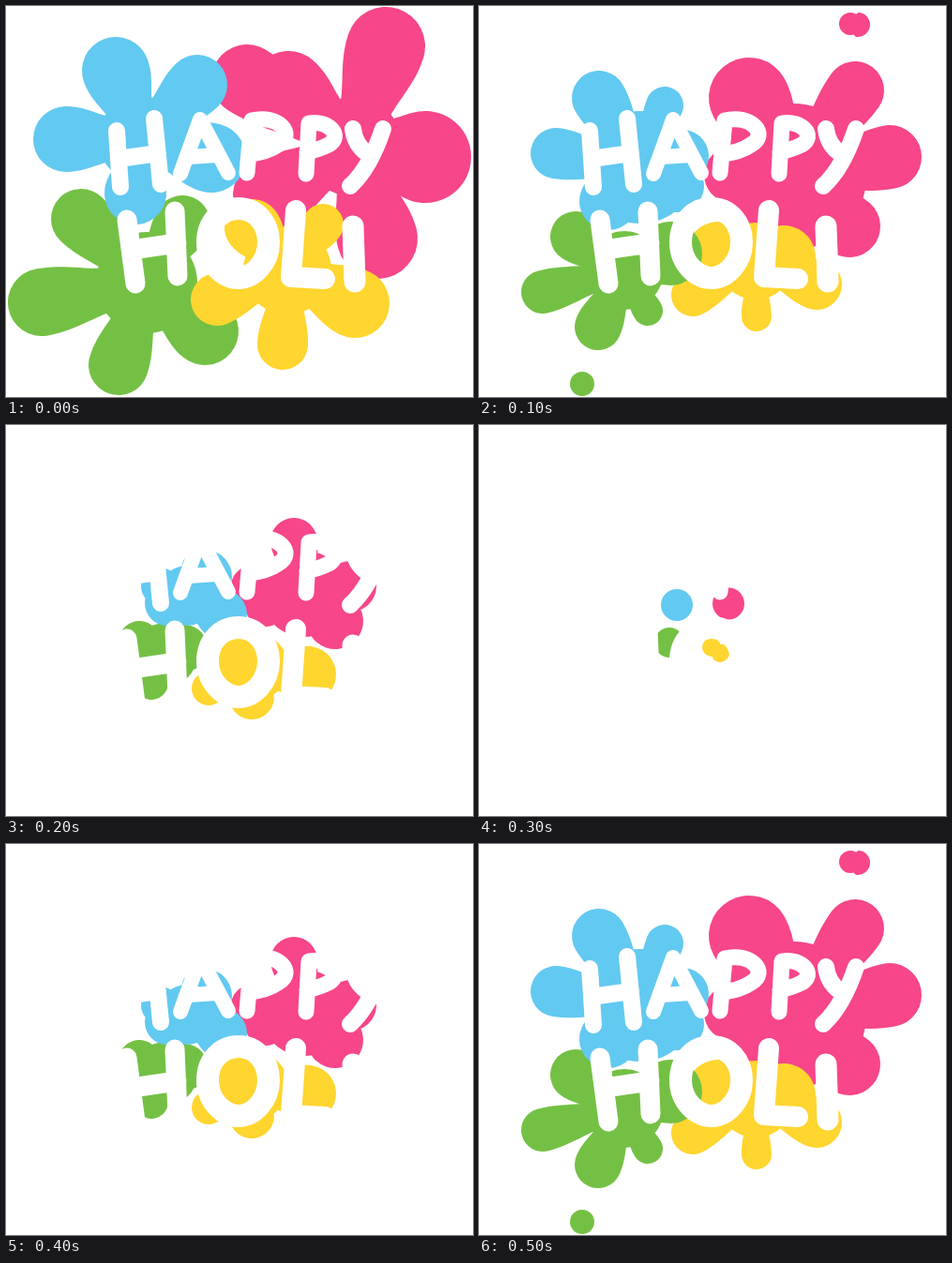
Write an HTML page with a canvas that moves like this. It is 498x417 px and loops after 600 ms.

```html
<!DOCTYPE html>
<html lang="en">
<head>
<meta charset="utf-8">
<title>Happy Holi</title>
<style>
html, body { margin: 0; width: 100%; height: 100%; overflow: hidden; background: #fff; }
canvas { display: block; width: 100vw; height: 100vh; }
</style>
</head>
<body>
<canvas id="stage" width="498" height="417"></canvas>
<script>
const ctx = document.getElementById('stage').getContext('2d');
const PINK = '#f7468a', BLUE = '#62c9f1', GREEN = '#74c044', YELLOW = '#ffd52f';

// A splat is a round core (x, y, radius) with petals, each given by its round tip.
function splat(color, x, y, core, ...petals) {
  ctx.fillStyle = color;
  ctx.beginPath();
  ctx.arc(x, y, core, 0, 7);
  ctx.fill();
  for (const [tipX, tipY, r] of petals) {
    const length = Math.hypot(tipX - x, tipY - y), neck = r * 0.55;
    ctx.save();
    ctx.translate(x, y);
    ctx.rotate(Math.atan2(tipY - y, tipX - x));
    ctx.beginPath();
    ctx.moveTo(0, -neck);
    ctx.bezierCurveTo(length * 0.5, -neck, length * 0.65, -r, length, -r);
    ctx.arc(length, 0, r, -Math.PI / 2, Math.PI / 2);
    ctx.bezierCurveTo(length * 0.65, r, length * 0.5, neck, 0, neck);
    ctx.fill();
    ctx.restore();
  }
}

// Splats of each pose, in paint order.
const wide = [
  [PINK, 370, 150, 53, [405, 43, 42], [447, 161, 49], [396, 248, 43], [282, 202, 40], [257, 79, 38], [301, 88, 40]],
  [GREEN, 150, 295, 54, [80, 227, 32], [38, 316, 36], [120, 383, 32], [212, 347, 36], [188, 232, 30]],
  [YELLOW, 300, 282, 47, [263, 236, 30], [338, 233, 22], [372, 317, 37], [295, 361, 27], [225, 313, 28]],
  [BLUE, 144, 142, 46, [117, 69, 36], [64, 142, 35], [138, 200, 33], [219, 162, 37], [204, 84, 32]]
];
const mid = [
  [PINK, 335, 182, 78, [288, 98, 43], [401, 90, 31], [438, 161, 34], [395, 235, 33], [270, 180, 30]],
  [YELLOW, 295, 272, 41, [228, 308, 23], [296, 331, 16], [360, 297, 27], [325, 268, 34], [255, 264, 34]],
  [GREEN, 155, 282, 42, [103, 246, 27], [68, 305, 23], [127, 342, 25], [180, 325, 16], [204, 264, 34]],
  [BLUE, 172, 172, 60, [128, 98, 29], [82, 157, 27], [198, 106, 20], [217, 160, 28], [138, 208, 31], [212, 192, 28]],
  [PINK, 396, 19, 12, [404, 20, 13]],
  [GREEN, 110, 403, 13]
];
const small = [
  [PINK, 318, 180, 46, [307, 124, 25], [368, 172, 27], [351, 209, 30], [262, 172, 22], [277, 193, 22]],
  [GREEN, 170, 245, 34, [142, 231, 22], [155, 275, 18], [190, 238, 25]],
  [YELLOW, 265, 258, 36, [262, 290, 24], [322, 266, 30], [216, 281, 18], [242, 246, 24]],
  [BLUE, 193, 182, 32, [212, 162, 29], [164, 172, 20], [230, 202, 27], [172, 190, 24]]
];
const tiny = [
  [PINK, 266, 190.5, 17],
  [GREEN, 203, 232, 16],
  [YELLOW, 248, 237, 10, [257, 243, 10]],
  [BLUE, 211, 192, 17]
];
const poses = [wide, mid, small, tiny, small, mid];

// Letter strokes: [width, path].
const letters = [
  [18, 'M118 133L122 193M158 120L165 190M120 163L162 157'],
  [16, 'M186 179L207 121L237 178M195 161L225 159'],
  [17, 'M262 122L257 178M262 122C290 115 310 137 290 148C280 155 269 157 259 158'],
  [17, 'M323 125L320 179M323 125C344 121 360 139 344 148Q334 153 321 156'],
  [18, 'M370 131Q372 148 385 157M402 131Q388 173 367 192'],
  [21, 'M129 228L138 296M180 219L183 288M134 260L182 253'],
  [24, 'M248 216C266 216 280 231 280 252S264 290 248 290S215 274 215 252S230 216 248 216Z'],
  [22, 'M309 218L304 289L340 291'],
  [23, 'M370 235L372 294']
].map(([width, d]) => [width, new Path2D(d)]);

function draw(step) {
  ctx.fillStyle = '#fff';
  ctx.fillRect(0, 0, 498, 417);
  for (const shape of poses[step]) splat(...shape);
  ctx.strokeStyle = '#fff';
  ctx.lineCap = ctx.lineJoin = 'round';
  for (const [width, path] of letters) {
    ctx.lineWidth = width;
    ctx.stroke(path);
  }
}

function tick() {
  draw(Math.floor(performance.now() % 600 / 100));
  requestAnimationFrame(tick);
}
tick();
</script>
</body>
</html>
```
